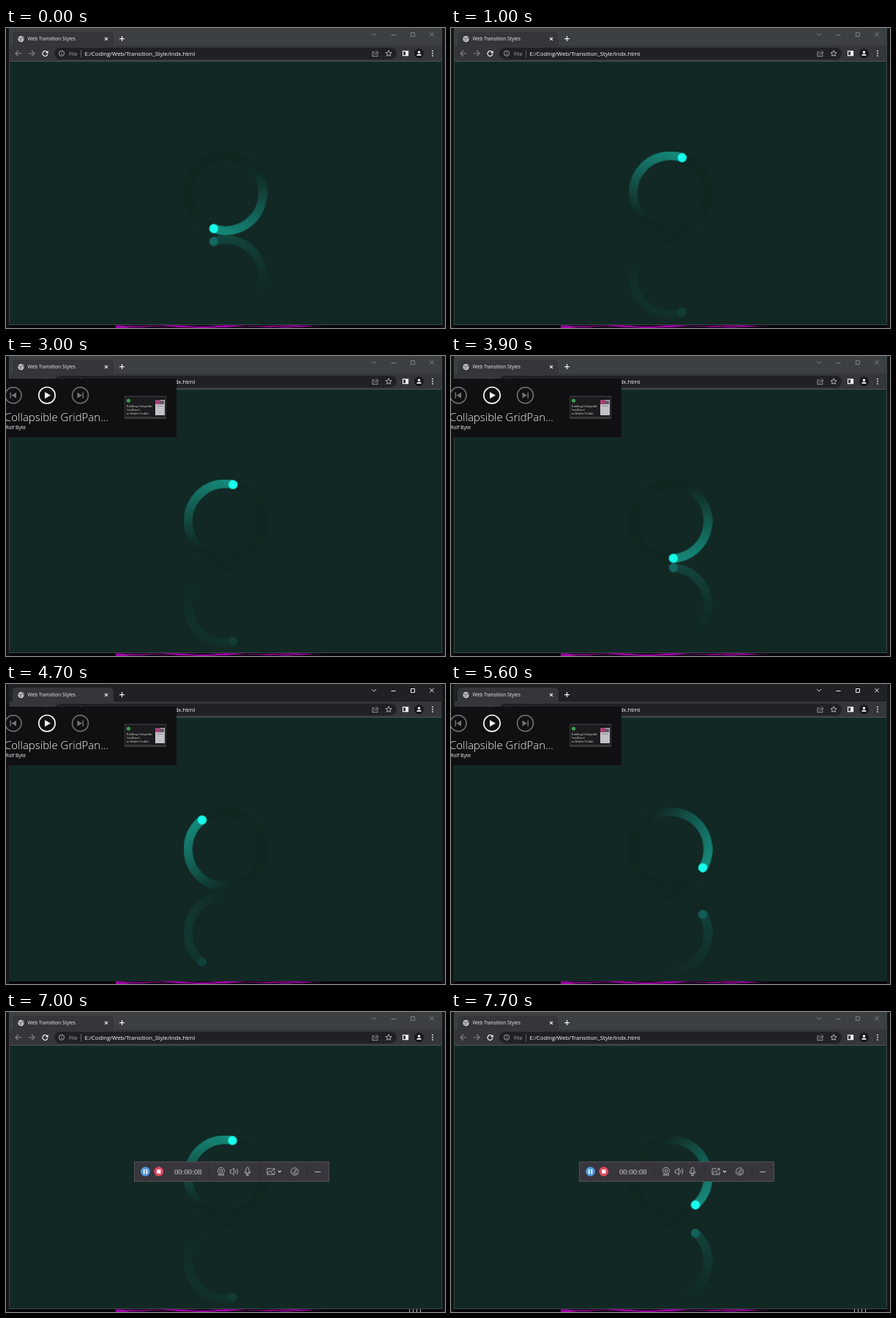
An HTML page with a canvas that plays this animation: 600x410 px, repeating every 7800 ms.

```html
<!DOCTYPE html>
<html>
<head>
<meta charset="utf-8">
<style>
html, body { margin: 0; width: 100%; height: 100%; overflow: hidden; background: #141418; }
canvas { display: block; }
</style>
</head>
<body>
<canvas id="stage" width="600" height="410"></canvas>
<script>
const LOOP = 7800, STEP = 100, TAU = Math.PI * 2;
const SANS = '"Open Sans", "Noto Sans", sans-serif';
const c = document.getElementById('stage').getContext('2d');
const ringCanvas = document.createElement('canvas');
ringCanvas.width = ringCanvas.height = 115;
const ring = ringCanvas.getContext('2d');

// [time, degrees clockwise from the top]; the captured spin drifts slightly
const SPIN = [[0, 198.4], [1000, 378.2], [2000, 558.4], [3000, 731.7],
              [4700, 1041.3], [6300, 1323.4], [7800, 1596.4]];

function spinAt(t) {
  const i = SPIN.findIndex(p => p[0] > t);
  const [t0, a0] = SPIN[i - 1], [t1, a1] = SPIN[i];
  return (a0 + (a1 - a0) * (t - t0) / (t1 - t0)) * Math.PI / 180;
}

function rect(x, y, w, h, color) {
  c.fillStyle = color;
  c.fillRect(x, y, w, h);
}
function round(x, y, w, h, r, color) {
  c.fillStyle = color;
  c.beginPath();
  c.roundRect(x, y, w, h, r);
  c.fill();
}
function disc(x, y, r, color) {
  c.fillStyle = color;
  c.beginPath();
  c.arc(x, y, r, 0, TAU);
  c.fill();
}
function line(path, color, width = 1, x = 0, y = 0) {
  c.save();
  c.translate(x, y);
  c.strokeStyle = color;
  c.lineWidth = width;
  c.stroke(new Path2D(path));
  c.restore();
}
function circle(x, y, r, color, width = 1) {
  c.strokeStyle = color;
  c.lineWidth = width;
  c.beginPath();
  c.arc(x, y, r, 0, TAU);
  c.stroke();
}
function fill(path, color, x = 0, y = 0) {
  c.save();
  c.translate(x, y);
  c.fillStyle = color;
  c.fill(new Path2D(path));
  c.restore();
}
function text(s, x, y, size, color, font = SANS, weight = 400) {
  c.font = `${weight} ${size}px ${font}`;
  c.fillStyle = color;
  c.fillText(s, x, y);
}

function desktop(t) {
  rect(0, 0, 600, 410, '#141418');
  rect(4, 406, 592, 4, '#08080a');
  // magenta wallpaper edge, crossed by a dark ripple
  c.fillStyle = '#a000a6';
  c.beginPath();
  c.moveTo(150, 407);
  for (let x = 150; x <= 430; x += 4)
    c.lineTo(x, 406.8 + Math.sin(x / 13) * 0.6);
  for (let x = 430; x >= 150; x -= 4)
    c.lineTo(x, 409.3 + Math.sin(x / 19) - Math.max(0, x - 330) / 60);
  c.fill();
  c.strokeStyle = '#1a021c';
  c.lineWidth = 0.8;
  c.beginPath();
  for (let x = 165; x < 430; x += 4) c.lineTo(x, 408.6 + Math.sin(x / 9) * 1.1);
  c.stroke();

  if (t >= 6000) {
    const late = t >= 7000;
    for (let i = 0; i < (late ? 4 : 8); i++) {
      const h = late ? 5 : 2 + Math.sin(i * 2.3 + t / 130);
      rect((late ? 551 : 556) + i * 5, 410 - h, 1, h, '#b8b8ba');
    }
  }
}

function browser(active) {
  const control = active ? '#f2f2f2' : '#85878b';
  const dim = '#85888c', white = '#f1f3f4';
  rect(4, 0, 592, 406, '#122824');
  rect(4, 0, 592, 25, active ? '#202124' : '#3c4043');
  rect(4, 24, 592, 21, '#35363a');
  rect(4, 45, 592, 1, '#4b5355');
  round(9, 5, 138, 20, [5, 5, 0, 0], '#35363a');

  disc(20.5, 15, 4.2, '#c0c3c7');
  line('M-3 -1.5L0 0L-1 3M1 -3L2 -1L4 0', '#44464a', 1, 20.5, 15);
  text('Web Transition Styles', 29.5, 17.3, 6.6, '#eceef1');
  line('M-2 -2L2 2M2 -2L-2 2', white, 1.1, 137, 14.8);
  line('M-3.5 0H3.5M0 -3.5V3.5', white, 1.2, 158.5, 14.6);

  line('M-3 -1.5L0 1.5L3 -1.5', control, 0.9, 503, 8.6);
  line('M-3 0H3', control, 1, 529.5, 9.5);
  line('M-2.5 -2.5H2.5V2.5H-2.5Z', control, 1, 556, 9);
  line('M-2.7 -2.7L2.7 2.7M2.7 -2.7L-2.7 2.7', control, 1, 582, 8.7);

  line('M4 0H-4M0 -4L-4 0L0 4', dim, 1.1, 17, 34.7);
  line('M-4 0H4M0 -4L4 0L0 4', dim, 1.1, 35, 34.7);
  line('M3 -1.5A3.5 3.5 0 1 0 3.4 1', white, 1.2, 53.5, 34.7);
  fill('M4.2 -4V-.3H.5Z', white, 53.5, 34.7);
  round(66, 27, 468, 16, 8, '#202124');
  circle(76, 34.7, 3.6, '#b4b7bb', 0.9);
  line('M0 -2V-1M0 -.3V2', '#b4b7bb', 0.9, 76, 34.7);
  text('File', 86, 37.5, 7.4, '#9aa0a6');
  rect(102, 30, 1, 10, '#5f6368');
  text('E:/Coding/Web/Transition_Style/indx.html', 107.5, 37.5, 7.8, '#fff', SANS, 500);

  line('M-1 -2H-4V4H3V2M-2 2Q-1 -1 3 -1M1 -4L4 -1L1 2', '#b4b7bb', 0.8, 505, 34.7);
  line('M0 -4L1.2 -1.3L4 -1L1.9 .9L2.5 3.7L0 2.2L-2.5 3.7L-1.9 .9L-4 -1L-1.2 -1.3Z',
       '#d4d6d9', 0.8, 523, 34.7);
  line('M-3.5 -3H3.5V3H-3.5Z', white, 1.2, 546, 34.7);
  rect(546, 31.7, 4, 6, white);
  disc(564.5, 34.7, 6.5, '#17181a');
  disc(564.5, 33, 1.8, white);
  fill('M-3.3 3Q-3 .7 0 .7Q3 .7 3.3 3Z', white, 564.5, 34.7);
  for (const y of [31.5, 34.7, 37.9]) disc(583, y, 0.9, white);
  c.strokeStyle = active ? '#1d302d' : '#3a4646';
  c.lineWidth = 1;
  c.strokeRect(4.5, -1.5, 591, 407);
}

function loader(t) {
  ring.clearRect(0, 0, 115, 115);
  ring.save();
  ring.translate(57.5, 57.2);
  ring.rotate(spinAt(t));
  ring.beginPath();
  ring.arc(0, 0, 57.3, 0, TAU);
  ring.arc(0, 0, 45.2, 0, TAU);
  ring.fillStyle = '#112521';
  ring.fill('evenodd');
  ring.save();
  ring.clip('evenodd');
  const tail = ring.createLinearGradient(0, -57, 0, 46);
  tail.addColorStop(0, 'rgba(26,225,200,.54)');
  tail.addColorStop(1, 'rgba(26,225,200,0)');
  ring.fillStyle = tail;
  ring.fillRect(-58, -58, 58, 104);
  ring.restore();
  ring.fillStyle = '#17fcec';
  ring.beginPath();
  ring.arc(0, -51, 6.2, 0, TAU);
  ring.fill();
  ring.restore();
  c.drawImage(ringCanvas, 242.5, 168.5);

  // fading mirror image below
  const fade = ring.createLinearGradient(0, 0, 0, 115);
  fade.addColorStop(0, 'rgba(0,0,0,.08)');
  fade.addColorStop(1, 'rgba(0,0,0,.32)');
  ring.globalCompositeOperation = 'destination-in';
  ring.fillStyle = fade;
  ring.fillRect(0, 0, 115, 115);
  ring.globalCompositeOperation = 'source-over';
  c.save();
  c.translate(242.5, 397.5);
  c.scale(1, -1);
  c.drawImage(ringCanvas, 0, 0);
  c.restore();
}

function mediaPopup(alpha) {
  const grey = '#77777a';
  c.save();
  c.globalAlpha = alpha;
  rect(0, 31, 233, 80, '#101013');
  circle(10, 53.7, 11, grey, 1.5);
  circle(56, 53.7, 11.2, '#fff', 1.7);
  circle(101.5, 53.7, 11, grey, 1.5);
  fill('M-3 -4.5L5 0L-3 4.5Z', '#fff', 56, 53.7);
  fill('M-4.5 -4H-3V4H-4.5ZM4 -4L-2.5 0L4 4Z', grey, 10, 53.7);
  fill('M4.5 -4H3V4H4.5ZM-4 -4L2.5 0L-4 4Z', grey, 101.5, 53.7);
  text('Collapsible GridPan...', -2, 89, 15, '#fff', SANS, 300);
  text('Rolf Byte', -1, 99.8, 6.8, '#fff');

  rect(162, 54.5, 57, 31.5, '#39393c');
  rect(163, 56, 55, 27, '#1a1a1d');
  disc(167.5, 61, 2.6, '#3fa45b');
  ['Building Collapsible', 'GridPanel', 'in Mobile Toolkit'].forEach((s, i) =>
    text(s, 165, 70 + i * 5, 3.7, '#d8d8d8', '"Noto Serif", serif'));
  rect(204, 60, 13, 21, '#c9c9cd');
  rect(204, 60, 7, 6, '#a33f70');
  rect(206, 68, 9, 1, '#8b8b91');
  rect(211, 61, 5, 5, '#555860');
  c.restore();
}

function recorder() {
  const ink = '#b9b6bd';
  round(175, 204.5, 267, 27, 2, '#38353d');
  c.strokeStyle = '#525058';
  c.lineWidth = 1;
  c.strokeRect(175.5, 205, 266, 26.5);
  disc(190.5, 218, 6.4, '#4b97dc');
  rect(187.8, 214.8, 1.7, 6.5, '#fff');
  rect(191.5, 214.8, 1.7, 6.5, '#fff');
  disc(208.8, 218, 6.4, '#df4860');
  rect(206.2, 215.4, 5.2, 5.2, '#fff');
  text('00:00:08', 230, 221.7, 10.6, '#d0ced3', '"Liberation Serif", serif');
  for (const x of [277, 347, 411]) rect(x, 206, 1, 25, '#302d34');

  circle(294, 217, 4.5, ink, 0.9);
  circle(294, 217, 2, ink, 0.9);
  line('M-2 3L-4 5.5H4L2 3', ink, 0.9, 294, 217.5);
  line('M-5 -2H-3L0 -5V5L-3 2H-5ZM2 -2Q3.5 0 2 2M4 -4Q7 0 4 4', ink, 0.9, 311.5, 218);
  line('M-2 -3A2 2 0 0 1 2 -3V1A2 2 0 0 1 -2 1ZM-4 0Q-4 4 0 4Q4 4 4 0M0 4V6M-2 6H2',
       ink, 0.9, 330, 217.5);
  line('M1 -4H-5V4H5V0M-5 3L-1 -1L3 4M1 0L5 -4M2 -4H5V-1', ink, 0.9, 362, 218);
  line('M-2 -1L0 1L2 -1', '#dddbe0', 1.1, 374, 218);
  circle(394.5, 218, 5, ink, 0.9);
  line('M-2.5 2L1.5 -3L3 -1.5L-1 2.5ZM0 3H4', ink, 0.9, 394.5, 218);
  line('M-4 0H4', ink, 1, 426, 218.5);
}

function draw() {
  const t = Math.floor(performance.now() % LOOP / STEP) * STEP;
  desktop(t);
  browser(t >= 4400 && t < 7000);
  loader(t);
  if (t >= 2700 && t < 6500) mediaPopup(Math.min(0.97, (6500 - t) / 600));
  if (t >= 7000) recorder();
  requestAnimationFrame(draw);
}
draw();
</script>
</body>
</html>
```
